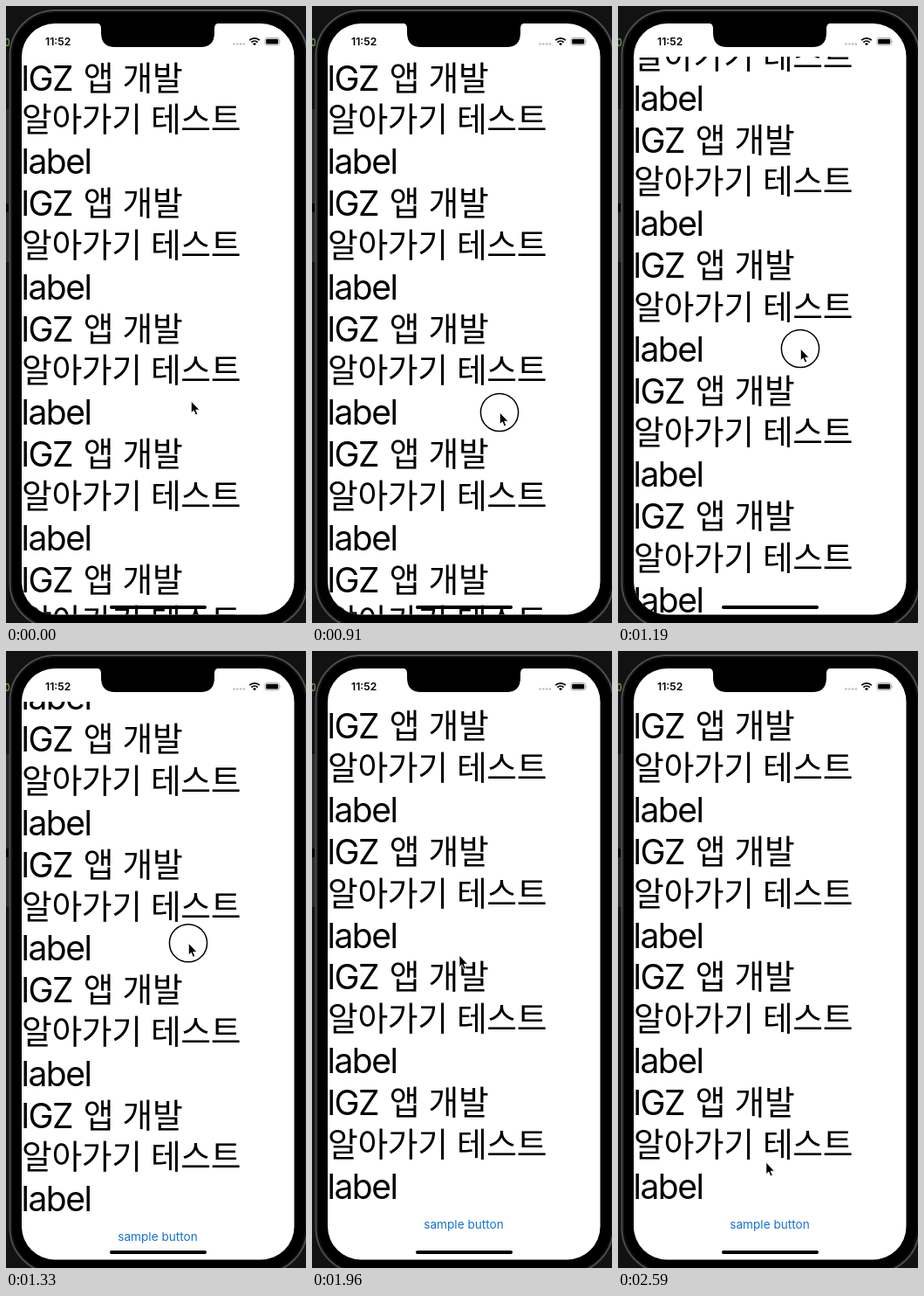
These frames come from a looping animation (344 by 706 pixels, 2800 ms). An HTML page:

```html
<!DOCTYPE html>
<html lang="ko">
<head>
<meta charset="utf-8">
<title>Scrolling phone list</title>
<style>
  html, body { margin: 0; width: 100%; height: 100%; overflow: hidden; background: #121213; }
  svg { display: block; width: 344px; height: 706px; }
  text { font-family: Inter, "Liberation Sans", sans-serif; }
  .latin { font-size: 39px; letter-spacing: -1.5px; }
  .hangul { font-family: "Noto Sans CJK KR", "Noto Sans CJK", sans-serif; font-size: 37.8px; letter-spacing: -.35px; }
  .button { font-size: 13.6px; fill: #1272d6; text-anchor: middle; }
  .clock { font-size: 12.2px; font-weight: 600; text-anchor: middle; }
</style>
</head>
<body>
<svg viewBox="0 0 344 706">
  <defs>
    <clipPath id="screen"><rect x="18" y="20" width="312.5" height="676.5" rx="38"/></clipPath>
    <clipPath id="view"><rect x="18" y="58" width="313" height="640"/></clipPath>
  </defs>

  <!-- desktop edge and phone body -->
  <rect width="344" height="706" fill="#121213"/>
  <rect y="118" width="4" height="175" fill="#2a2a2b"/>
  <rect y="226" width="3" height="10" fill="#050505"/>
  <ellipse cx="1.5" cy="41.5" rx="2" ry="4" fill="none" stroke="#6c9a45" stroke-width="1.3"/>
  <rect x="4.5" y="5" width="341" height="707" rx="52" fill="#000" stroke="#4c4c4e" stroke-width="2"/>
  <rect x="6.5" y="7" width="337" height="703" rx="50" fill="#000" stroke="#161617"/>

  <g clip-path="url(#screen)">
    <rect x="18" y="20" width="313" height="677" fill="#fff"/>
    <g clip-path="url(#view)"><g id="list"></g></g>
    <rect x="119" y="686.1" width="111" height="3.8" rx="1.9"/>
  </g>

  <path d="M103 19.5q6 0 6 6v5q0 16.5 16 16.5h98q16 0 16-16.5v-5q0-6 6-6z"/>
  <text class="clock" x="59.7" y="45">11:52</text>
  <g id="dots" fill="#bdbdbd"></g>
  <g fill="none" stroke="#000" stroke-width="1.8">
    <path d="M279.2 39.2a8.3 8.3 0 0 1 11.6 0M281.4 41.6a5.2 5.2 0 0 1 7.2 0"/>
    <path d="M283 43.2a3 3 0 0 1 4 0l-2 2.1z" fill="#000" stroke="none"/>
  </g>
  <rect x="296.9" y="36.4" width="16.6" height="8.4" rx="2.4" fill="none" stroke="#999" stroke-width=".8"/>
  <rect x="298.2" y="37.7" width="14" height="5.8" rx="1.3"/>
  <path d="M314.6 39.2q1.6 1.4 0 2.8z" fill="#999"/>

  <g id="pointer">
    <circle id="touch" r="21.6" fill="none" stroke="#000" stroke-width="1.5"/>
    <path d="M.3 0V13.8L3.3 11L5.4 16L7.8 15L5.7 10.2H10Z" stroke="#fff" stroke-width=".9"/>
  </g>
</svg>
<script>
const LOOP = 2800, TICK = 70, LINE = 47.83;
const $ = id => document.getElementById(id);

function add(parent, tag, attrs, str = "") {
  const el = document.createElementNS("http://www.w3.org/2000/svg", tag);
  for (const name in attrs) el.setAttribute(name, attrs[name]);
  el.textContent = str;
  $(parent).append(el);
}

const addText = (cls, x, y, str) => add("list", "text", { class: cls, x, y }, str);

for (let i = 0; i < 4; i++) add("dots", "circle", { cx: 261.5 + 3.8 * i, cy: 43.5, r: 1.3 });

for (let i = 0; i < 5; i++) {
  const y = 96.6 + i * 3 * LINE;
  addText("latin", 17.5, y, "lGZ");
  addText("hangul", 88.8, y - 1, "앱 개발");
  addText("hangul", 18, y + LINE - 1, "알아가기 테스트");
  addText("latin", 17.5, y + 2 * LINE, "label");
}
addText("button", 174, 800.4, "sample button");

const clamp = v => Math.min(1, Math.max(0, v));
const easeOut = p => 1 - (1 - p) ** 1.8;

function draw(now) {
  const t = Math.floor((now % LOOP) / TICK) * TICK;
  const ramp = (from, to) => clamp((t - from) / (to - from));

  const approach = ramp(140, 420);
  const press = ramp(630, 910);
  const swipe1 = easeOut(ramp(910, 1190));
  const swipe2 = easeOut(ramp(1190, 1470));
  const settle = easeOut(ramp(1470, 1750));
  const leave = ramp(1890, 2450);
  const exit = ramp(2450, 2590);

  const x = 212 + 3 * approach - 6 * clamp(swipe1 * 1.4) - 40.5 * settle + leave;
  const y = 452 + 19 * approach - 6 * press - 73 * swipe1 - 81 * swipe2
    + 23 * settle + 113 * leave + 138 * exit;
  const scroll = -72.5 * swipe1 - 73.5 * swipe2 + 6.4 * settle;

  $("list").setAttribute("transform", `translate(0 ${scroll})`);
  $("pointer").setAttribute("transform", `translate(${x} ${y})`);
  $("touch").setAttribute("visibility", t >= 700 && t < 1540 ? "visible" : "hidden");
}

const start = performance.now();
function frame() {
  draw(performance.now() - start);
  requestAnimationFrame(frame);
}
frame();
</script>
</body>
</html>
```
